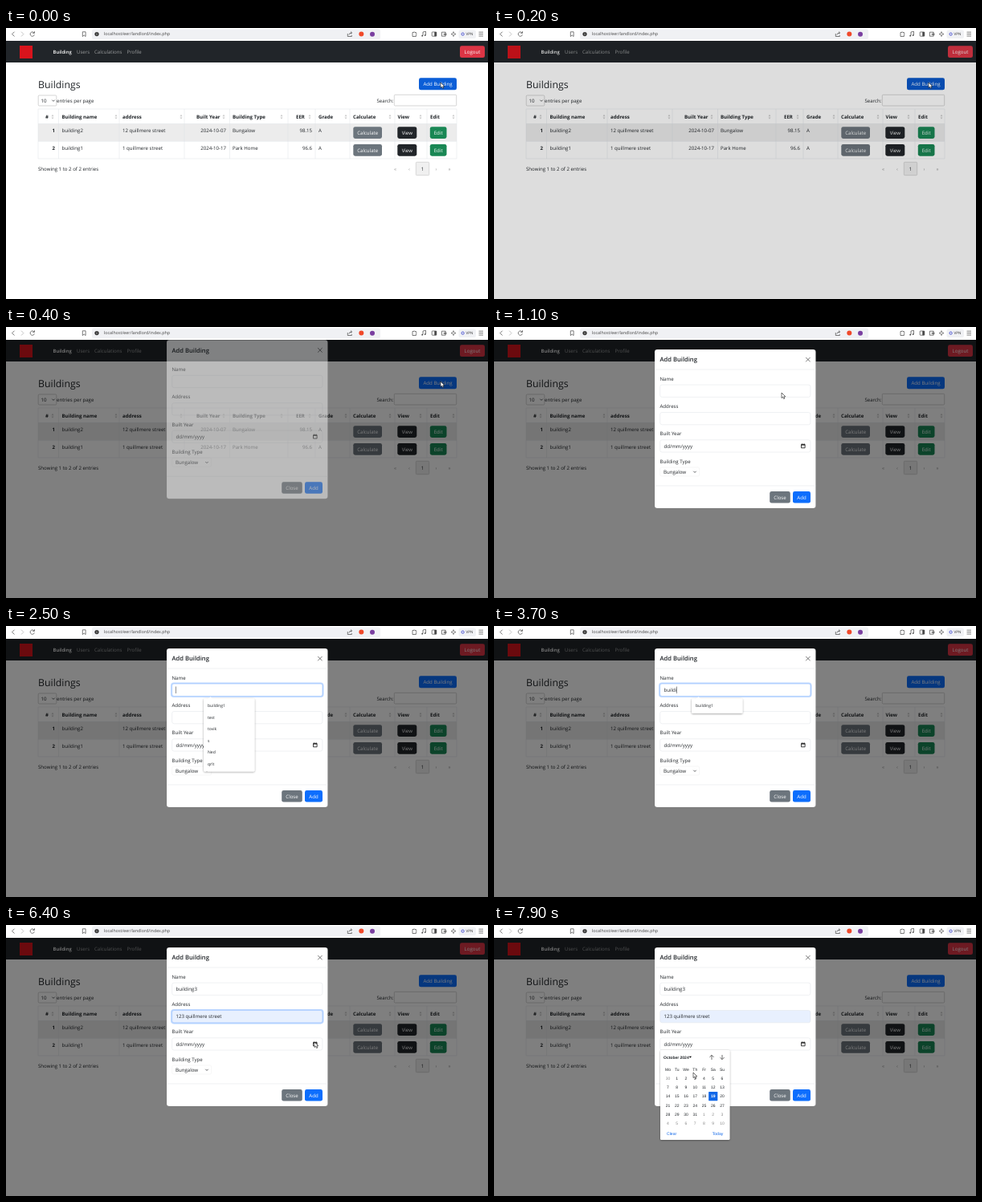
An HTML page for the animation above (8 s loop, 600 px wide and 338 px high).

```html
<!DOCTYPE html>
<html lang="en">
<head>
<meta charset="utf-8">
<title>Buildings</title>
<style>
html, body { margin: 0; width: 100%; height: 100%; overflow: hidden; background: #fff }
svg { display: block; width: 100vw; height: 100vh; font: 6.1px 'Open Sans', 'Noto Sans', sans-serif; text-rendering: geometricPrecision }
text { white-space: pre }
.cal { font-family: 'Liberation Sans', Arial, sans-serif }
</style>
</head>
<body>
<svg id="stage" viewBox="0 0 600 338"></svg>
<script>
const LOOP = 8000, STEP = 100, INK = '#212529', LINE = '#dee2e6', BLUE = '#0d6efd';
const $ = id => document.getElementById(id);
const clamp = v => Math.max(0, Math.min(1, v));

// y is the middle of the capitals
const text = (x, y, s, { size = 6.1, fill = INK, weight = 400, anchor = 'start', id = '' } = {}) =>
  `<text ${id && `id="${id}"`} x="${x}" y="${y + size * .36}" font-size="${size}" fill="${fill}" font-weight="${weight}" text-anchor="${anchor}">${s}</text>`;
const rect = (x, y, w, h, fill, more = '') =>
  `<rect x="${x}" y="${y}" width="${w}" height="${h}" fill="${fill}" ${more}/>`;
const path = (d, stroke = INK, width = .7, fill = 'none') =>
  `<path d="${d}" fill="${fill}" stroke="${stroke}" stroke-width="${width}"/>`;
const dot = (x, y, r, fill, more = '') => `<circle cx="${x}" cy="${y}" r="${r}" fill="${fill}" ${more}/>`;
const button = (x, y, w, h, fill, label, id = '') =>
  rect(x, y, w, h, fill, `rx="2.4" ${id && `id="${id}"`}`) +
  text(x + w / 2, y + h / 2 + .2, label, { fill: '#fff', anchor: 'middle' });
const chevron = (x, y) => path(`M${x - 1.7} ${y - .8}l1.7 1.7 1.7 -1.7`);

function browserBar() {
  const g = '#444';
  return rect(0, 0, 600, 16, '#fff') +
    rect(107, 1.5, 359, 12.5, '#f0f1f4', 'rx="2.5"') +
    path('M10.5 4.7L7.6 7.6l2.9 2.9', g) + path('M19 4.7l2.9 2.9L19 10.5', '#aaa') +
    path('M35 6A2.7 2.7 0 1 0 35.4 8.4M35.5 4.2V6.4H33.2', g) +
    path('M95.3 4.8h3.8v5.8l-1.9 -1.6l-1.9 1.6z', g) +
    dot(113, 7.6, 2.6, '#333') + path('M113 7.1v2M113 5.7v.8', '#fff', .6) +
    text(122, 7.5, 'localhost/eer/landlord/index.php', { size: 5.35, fill: '#444' }) +
    path('M425.3 7v3.5h5V9M427 8.5q0 -2.5 3.5 -2.5M429 4.5l1.6 1.5l-1.6 1.5', g) +
    dot(442.3, 7.6, 3, '#f0492a') + dot(456, 7.8, 3, '#7a3fa0') +
    path('M506 5.5h1.6q.4 -1.6 1.2 0h1.6v1.6q1.6 .6 0 1.5v1.9H506z', g) +
    path('M519 9.5V5l3.5 -.7v4.6', g) + dot(518.2, 9.7, .9, g) + dot(521.7, 9.1, .9, g) +
    rect(530.2, 5, 5.6, 5.2, 'none', `stroke="${g}" stroke-width=".7" rx=".6"`) + rect(533.3, 5, 2.5, 5.2, g) +
    path('M542.4 5.2h4.8v5h-4.8zM545.2 7h2.8v1.5h-2.8z', g) +
    path('M557 4.6l.8 2.2 2.2 .8 -2.2 .8 -.8 2.2 -.8 -2.2 -2.2 -.8 2.2 -.8z', g, .6) +
    rect(563.5, 2.5, 21.5, 10.5, '#f0f1f4', 'rx="2.5"') +
    dot(568.6, 7.6, 1.6, 'none', 'stroke="#4c54d2" stroke-width="1"') +
    text(572.6, 7.6, 'VPN', { size: 4.6, fill: '#333' }) +
    path('M588.5 5.2h5.5M588.5 7.6h5.5M588.5 10h5.5', g);
}

function navBar() {
  return rect(0, 16, 600, 27, INK) + rect(17, 22, 16, 16, '#d8141c') +
    text(58.5, 30, 'Building', { fill: '#fff', weight: 600, size: 5.9 }) +
    [[88, 'Users'], [110, 'Calculations'], [150.5, 'Profile']]
      .map(([x, s]) => text(x, 30, s, { fill: '#9b9d9e' })).join('') +
    button(565, 22.3, 31, 14.8, '#dc3545', 'Logout');
}

function table() {
  const heads = [[49, '#', 58], [69.5, 'Building name', 137], [145, 'address', 218], [237, 'Built Year', 271],
    [282, 'Building Type', 343], [361, 'EER', 378], [389, 'Grade', 423], [432, 'Calculate', 478],
    [487.5, 'View', 516], [528, 'Edit', 557]];
  const rows = [['1', 'building2', '12 quillmere street', '2024-10-07', 'Bungalow', '98.15', 'A'],
    ['2', 'building1', '1 quillmere street', '2024-10-17', 'Park Home', '96.6', 'A']];
  const cells = [[61, 'end'], [69.5], [145], [274, 'end'], [282], [381, 'end'], [389]];
  let out = rect(40, 119.5, 521, 21.8, '#ececec');
  for (const x of [40, 65.5, 141, 222, 278.5, 351, 385, 428, 484, 524, 561]) out += path(`M${x} 101V163`, LINE, .5);
  for (const y of [101, 119.5, 141.3, 163]) out += path(`M40 ${y}H561`, LINE, .5);
  for (const [x, s, a] of heads)
    out += text(x, 110.8, s, { weight: 700 }) +
      `<path d="M${a - 1.5} 110.2h3l-1.5 -2.4zM${a - 1.5} 111.4h3l-1.5 2.4z" fill="#ccc"/>`;
  rows.forEach((row, r) => {
    const y = 128 + r * 21.7;
    row.forEach((s, i) => out += text(cells[i][0], y, s, { anchor: cells[i][1], weight: i ? 400 : 700 }));
    out += button(432.3, y - 4.8, 35.7, 14.8, '#6c757d', 'Calculate') +
      button(487.3, y - 4.8, 24, 14.8, INK, 'View') + button(527.8, y - 4.8, 20.7, 14.8, '#198754', 'Edit');
  });
  return out;
}

function page() {
  const box = 'stroke="#aaa" stroke-width=".5" rx="1.2"';
  return navBar() + text(40, 70.7, 'Buildings', { size: 12.3, weight: 500 }) +
    button(514, 62.3, 47, 15, '#0b5ed7', 'Add Building', 'open') +
    rect(40.2, 84, 22.6, 13, '#fff', box) + text(43.5, 90.5, '10') + chevron(59, 90.5) +
    text(63, 90.5, 'entries per page') + text(461.5, 90.5, 'Search:') + rect(483.3, 83.3, 77.4, 13.7, '#fff', box) +
    table() + text(40, 175.5, 'Showing 1 to 2 of 2 entries') +
    rect(510.3, 167.3, 16.4, 16.4, '#f0f0f0', 'stroke="#bbb" stroke-width=".5" rx="1"') +
    [['«', 484.5], ['‹', 502], ['1', 518.5], ['›', 535.5], ['»', 552]]
      .map(([s, x]) => text(x, 175.5, s, { anchor: 'middle', fill: s == 1 ? INK : '#999' })).join('');
}

function field(y, label, id) {
  return text(206.5, y, label) +
    rect(205.9, y + 6.7, 188.8, 16.9, 'none', `id="${id}Ring" rx="3" stroke="${BLUE}" stroke-opacity=".28" stroke-width="1.6" opacity="0"`) +
    rect(206.7, y + 7.5, 187.2, 15.3, '#fff', `id="${id}Box" rx="2.4" stroke="${LINE}" stroke-width=".5"`) +
    text(211.5, y + 15.3, '', { id });
}

function modal() {
  return rect(200, 28, 200.5, 198, '#fff', 'rx="3.2" stroke="#000" stroke-opacity=".175" stroke-width=".4"') +
    text(206.5, 40.6, 'Add Building', { size: 7.6, weight: 600 }) +
    path('M388.2 37.9l5.4 5.4M393.6 37.9l-5.4 5.4', '#555', .8) +
    path('M200 53H400.5M200 198H400.5', LINE, .5) +
    field(64.6, 'Name', 'name') + field(99, 'Address', 'addr') + field(133.3, 'Built Year', 'year') +
    path('M382.5 146.5h4.6v4.3h-4.6zM383.6 145.3v1M386 145.3v1M382.5 147.2h4.6', '#111', .8) +
    text(206.5, 167.7, 'Building Type') +
    rect(206.7, 175, 49, 11, '#fff', 'rx="2" stroke="#eee" stroke-width=".5"') +
    text(211, 180.6, 'Bungalow') + chevron(250, 180.6) +
    button(343.2, 205, 25.6, 14.6, '#6c757d', 'Close') + button(372, 205, 22, 14.6, BLUE, 'Add') +
    rect(211.6, 0, .5, 8.6, INK, 'id="caret"');
}

const shadowed = 'rx="1.6" filter="url(#shadow)"';

function suggestions(y, w, items, hover) {
  return rect(246, y, w, items.length * 14.5 + 4, '#fff', shadowed) +
    `<path d="M251.5 ${y + .3}l3 -2.4 3 2.4z" fill="#fff"/>` +
    items.map((s, i) => {
      const mid = y + 9.1 + i * 14.5;
      return (i === hover ? rect(246, mid - 7.2, w, 14.4, '#e8e8ea') : '') + text(251, mid, s, { size: 5.05 });
    }).join('');
}

function calendar() {
  const mid = { size: 5, anchor: 'middle' };
  let out = rect(207, 156, 86.5, 112, '#fff', shadowed) +
    text(211, 164.7, 'October 2024', { size: 5, weight: 700 }) + '<path d="M242.8 163.8h3.2l-1.6 2z"/>' +
    path('M271 168v-5.6M268.4 164.9l2.6 -2.6 2.6 2.6M284 162v5.6M281.4 165.1l2.6 2.6 2.6 -2.6', '#333', .7);
  'Mo Tu We Th Fr Sa Su'.split(' ').forEach((d, i) => out += text(216.5 + i * 11.25, 180, d, mid));
  for (let i = 0; i < 42; i++) {
    const x = 216.5 + i % 7 * 11.25, y = 191 + Math.floor(i / 7) * 11.3, d = new Date(2024, 8, 30 + i);
    const inside = d.getMonth() == 9, today = inside && d.getDate() == 19;
    if (today) out += rect(x - 5.6, y - 5.6, 11.2, 11.2, '#1067e8', 'rx=".6"');
    out += text(x, y, d.getDate(), { ...mid, fill: today ? '#fff' : inside ? INK : '#888', weight: today ? 700 : 400 });
  }
  return out + text(215, 260, 'Clear', { size: 5.1, fill: '#1067e8' }) +
    text(285.3, 260, 'Today', { size: 5.1, fill: '#1067e8', anchor: 'end' });
}

$('stage').innerHTML =
  `<defs><filter id="shadow" x="-10%" y="-10%" width="120%" height="125%">
    <feDropShadow dx="0" dy=".7" stdDeviation="1.1" flood-opacity=".4"/></filter></defs>` +
  page() + rect(0, 16, 600, 322, '#000', 'id="shade"') + `<g id="modal">${modal()}</g><g id="list"></g>` +
  `<g id="cal" class="cal">${calendar()}</g>` + browserBar() +
  '<path id="mouse" d="M0 0V6.6L1.6 5.2 2.7 7.6 3.8 7.1 2.8 4.8H4.8Z" fill="#fff" stroke="#111" stroke-width=".6"/>';
$('year').textContent = 'dd/mm/yyyy';

const keys = [2700, 3000, 3200, 3400, 3500, 3600, 3800, 4000, 4300];
const names = ['building1', 'test', 'tovik', 's', 'Ned', 'qrlt'];
const addresses = ['adadad', 'mkmkmk', '123 quillmere street', 's', 'UIUI', '1 quillmere street'];
const route = [[0, 541, 68], [500, 541, 68], [1000, 386, 84], [1200, 330, 80], [1400, 300, 79], [5000, 300, 185],
  [5500, 276, 163], [5800, 276, 163], [6300, 384, 146], [6700, 384, 146], [7300, 290, 212], [7900, 248, 184], [LOOP, 248, 184]];

function mouseAt(t) {
  const i = route.findIndex(p => p[0] > t), [t0, x0, y0] = route[i - 1], [t1, x1, y1] = route[i];
  const p = (t - t0) / (t1 - t0), e = p * p * (3 - 2 * p);
  return [x0 + (x1 - x0) * e, y0 + (y1 - y0) * e];
}

function focus(id, v) {
  $(id + 'Ring').setAttribute('opacity', v);
  $(id + 'Box').setAttribute('stroke', v > .1 ? '#86b7fe' : LINE);
}

function draw(t) {
  const show = (id, on) => $(id).setAttribute('visibility', on ? 'visible' : 'hidden');
  const fade = start => clamp((t - start) / 150);

  $('open').setAttribute('fill', t < 100 ? '#0b5ed7' : t < 400 ? '#0a58ca' : BLUE);
  $('shade').setAttribute('opacity', fade(160) / 2);
  const slide = -20 * (1 - clamp((t - 330) / 300)) ** 2;
  $('modal').setAttribute('opacity', fade(330));
  $('modal').setAttribute('transform', `translate(0 ${slide})`);

  focus('name', fade(1400) - fade(4630));
  focus('addr', fade(4630) - fade(6450));

  const typed = keys.filter(k => k <= t);
  $('name').textContent = 'building3'.slice(0, typed.length);
  const filled = t >= 5400;
  $('addr').textContent = filled ? addresses[2] : '';
  $('addrBox').setAttribute('fill', filled ? '#e8f0fe' : '#fff');

  const inAddr = t >= 4700, since = inAddr ? 4700 : typed.length ? typed.at(-1) : 1500;
  show('caret', t >= 1500 && t < 5400 && Math.floor((t - since) / 500) % 2 == 0);
  $('caret').setAttribute('x', 211.5 + $(inAddr ? 'addr' : 'name').getComputedTextLength());
  $('caret').setAttribute('y', inAddr ? 110 : 75.5);

  $('list').innerHTML =
    t >= 1500 && t < 4300 ? suggestions(90.4, 63.5, typed.length ? names.slice(0, 1) : names) :
    inAddr && t < 5800 ? suggestions(124.9, 72, addresses, filled ? 2 : -1) : '';
  show('cal', t >= 6600);
  show('mouse', t < 1500 || t >= 5000);
  $('mouse').setAttribute('transform', `translate(${mouseAt(t)})`);
}

const begin = performance.now();
let last = -1;
function tick() {
  const t = Math.floor((performance.now() - begin) % LOOP / STEP) * STEP;
  if (t != last) draw(last = t);
  requestAnimationFrame(tick);
}
tick();
</script>
</body>
</html>
```
